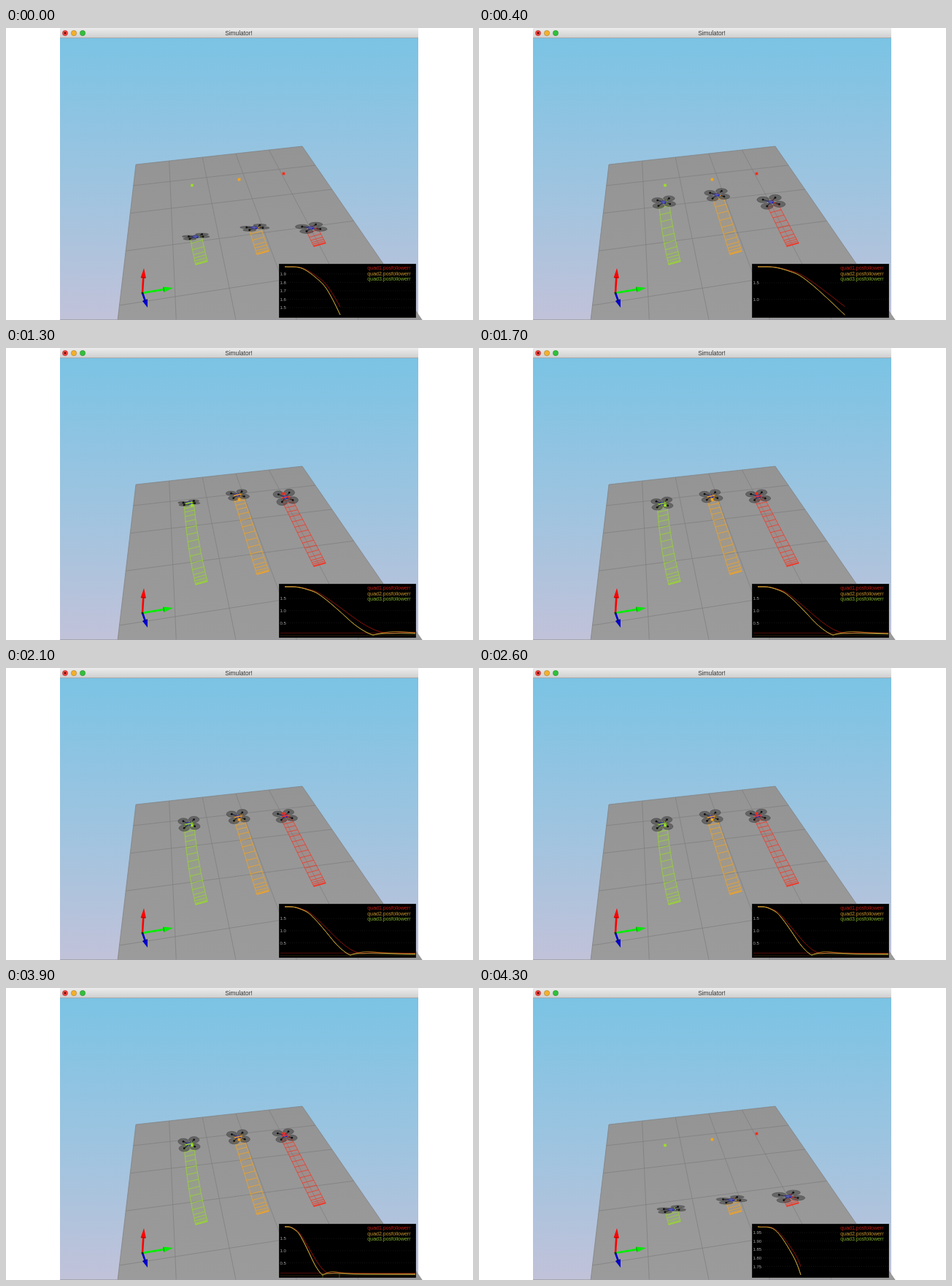
These frames come from a looping animation (640 px wide and 400 px high, 4.4 s). An HTML page with a canvas:

```html
<!DOCTYPE html>
<html lang="en">
<head>
<meta charset="utf-8">
<title>Simulator!</title>
<style>
  html, body { margin: 0; width: 100%; height: 100%; overflow: hidden; background: #fff; }
  canvas { display: block; width: 640px; height: 400px; }
</style>
</head>
<body>
<canvas id="stage" width="640" height="400"></canvas>
<script>
const ctx = document.getElementById('stage').getContext('2d');
const STEP = 100, STEPS = 44;
const FONT = '"Liberation Sans", Arial, sans-serif';
const lerp = (a, b, k) => a + (b - a) * k;

function segment(keys, x) {
  let i = 0;
  while (i < keys.length - 2 && x > keys[i + 1][0]) i++;
  const [x0] = keys[i], [x1] = keys[i + 1];
  return [i, Math.max(0, Math.min(1, (x - x0) / (x1 - x0)))];
}
function linear(keys, x) {
  const [i, k] = segment(keys, x);
  return lerp(keys[i][1], keys[i + 1][1], k);
}
function smooth(keys, x) {
  const [i, k] = segment(keys, x);
  const slope = j => {
    const a = keys[Math.max(0, j - 1)], b = keys[Math.min(keys.length - 1, j + 1)];
    return (b[1] - a[1]) / (b[0] - a[0]);
  };
  const h = keys[i + 1][0] - keys[i][0], k2 = k * k, k3 = k2 * k;
  return (2 * k3 - 3 * k2 + 1) * keys[i][1] + (k3 - 2 * k2 + k) * h * slope(i)
    + (3 * k2 - 2 * k3) * keys[i + 1][1] + (k3 - k2) * h * slope(i + 1);
}

// Simulated time per step; 1 is when the faster quads arrive.
const clock = [[0, .373], [1, .481], [9, 1.03], [14, 1.479], [22, 1.99], [33, 2.93], [40, 3.44], [43, 3.66]];

// Signed distance still to fly over simulated time.
const approach = [[0, 1.985], [.15, 1.965], [.3, 1.82], [.373, 1.7], [.481, 1.414], [.62, .98], [.78, .46], [.9, .16], [1, 0]];
const quads = [
  { color: '#ff2a18', label: '#c01c10', from: [430, 297], to: [381, 200], bow: 0, bend: 0, skew: 2.4, dot: [380.5, 199.5],
    error: [[0, 1.985], [.15, 1.97], [.3, 1.85], [.373, 1.75], [.481, 1.51], [.62, 1.15], [.78, .72], [.9, .43],
            [1.03, .19], [1.17, .07], [1.35, .1], [1.8, .06], [4, .04]],
    pitch: [[0, .35], [3, .25], [5, .5], [7, .85], [9, .95], [14, .65], [17, .52], [43, .55]] },
  { color: '#ffa516', label: '#c9952b', from: [352, 308], to: [319, 206], bow: .25, bend: 0, skew: 1.6, dot: [319.5, 207.5],
    error: [...approach, [1.22, -.13], [1.5, -.09], [1.9, -.05], [4, -.04]],
    pitch: [[0, .22], [3, .12], [5, .45], [7, .9], [9, .97], [12, .55], [14, .42], [17, .5], [22, .58], [43, .58]] },
  { color: '#9be022', label: '#7fae2b', from: [268, 322], to: [251, 215], bow: .25, bend: 9, skew: .6, dot: [255, 215.5],
    error: [...approach, [1.22, -.06], [1.5, -.05], [1.9, -.03], [4, -.02]],
    pitch: [[0, .2], [3, .1], [5, .45], [7, .95], [9, 1], [12, .4], [14, .2], [17, .5], [22, .6], [43, .6]] },
];

function place(quad, u) {
  const p = 1 - smooth(quad.error, u) / 1.985;
  const q = p + quad.bow * p * Math.max(0, 1 - p);
  const x = lerp(quad.from[0], quad.to[0], q) - quad.bend * q * (1 - q);
  return [x, lerp(quad.from[1], quad.to[1], q), q];
}

function line(points, color, width = 1) {
  ctx.beginPath();
  points.forEach(([x, y]) => ctx.lineTo(x, y));
  ctx.strokeStyle = color;
  ctx.lineWidth = width;
  ctx.stroke();
}
function fill(points, color) {
  ctx.beginPath();
  points.forEach(([x, y]) => ctx.lineTo(x, y));
  ctx.fillStyle = color;
  ctx.fill();
}
function ellipse(x, y, rx, ry, color, stroke) {
  ctx.beginPath();
  ctx.ellipse(x, y, rx, ry, 0, 0, 7);
  ctx.fillStyle = color;
  ctx.fill();
  if (stroke) {
    ctx.strokeStyle = stroke;
    ctx.lineWidth = .6;
    ctx.stroke();
  }
}
function text(string, x, y, size, color, align = 'left') {
  ctx.font = `${size}px ${FONT}`;
  ctx.textAlign = align;
  ctx.fillStyle = color;
  ctx.fillText(string, x, y);
}
function gradient(y0, y1, ...stops) {
  const g = ctx.createLinearGradient(0, y0, 0, y1);
  stops.forEach((c, i) => g.addColorStop(i / (stops.length - 1), c));
  return g;
}

function drawFloor() {
  const leftAt = y => [178 - (y - 187) * .117, y];
  const rightAt = y => [406 + (y - 162) * .69, y];
  fill([[178, 187], [406, 162], rightAt(400), leftAt(400)], gradient(162, 400, '#949494', '#9b9b9b'));
  for (let i = 0; i <= 5; i++) {
    const x = lerp(178, 406, i / 5), y = lerp(187, 162, i / 5);
    line([[x, y], [x + (400 - y) * lerp(-.117, .69, i / 5), 400]], '#7d7d7d', .7);
  }
  for (let i = 0; i < 5; i++) {
    const a = (187 + 3.4 * i) / (1 - .118 * i), b = (162 + 6.07 * i) / (1 - .106 * i);
    line([leftAt(a), rightAt(b)], '#7d7d7d', .7);
  }
}

function drawWindow() {
  ctx.fillStyle = gradient(0, 13, '#ececec', '#d0d0d0');
  ctx.fillRect(74, 0, 491, 13);
  ctx.fillStyle = '#aaa';
  ctx.fillRect(74, 13, 491, 1);
  ['#f4433c', '#f4b02c', '#2fc13a'].forEach((c, i) => ellipse(81 + 12 * i, 7, 3.7, 3.7, c, 'rgba(0,0,0,.3)'));
  ellipse(81, 7, 1.4, 1.4, '#5c0805');
  text('Simulator!', 319, 10, 8.4, '#333', 'center');
}

function arrow(x, y, color, dark) {
  const ox = 187, oy = 363, length = Math.hypot(x - ox, y - oy);
  const dx = (x - ox) / length, dy = (y - oy) / length;
  const head = Math.min(13, length * .5), bx = x - dx * head, by = y - dy * head;
  line([[ox, oy], [bx, by]], color, 2.6);
  fill([[bx - dy * 3.6, by + dx * 3.6], [x, y], [bx + dy * 3.6, by - dx * 3.6]], color);
  line([[bx - dy * 3.3, by + dx * 3.3], [bx + dy * 3.3, by - dx * 3.3]], dark, 1);
}

function drawTrail(quad, now) {
  const end = Math.min(now, 1.12), left = [], right = [];
  const edges = u => {
    const [x, y, q] = place(quad, u), w = lerp(8.2, 6.6, q), d = lerp(2.3, 1.4, q);
    return [[x - w, y + d], [x + w, y - d]];
  };
  ctx.globalAlpha = .85;
  for (let u = 0; u < end; u += .02) {
    const [a, b] = edges(u);
    left.push(a);
    right.push(b);
  }
  line(left, quad.color, .8);
  line(right, quad.color, .8);
  for (let u = 0; u < end; u += .055) line(edges(u), quad.color, .8);
  ctx.globalAlpha = .08;
  fill([...left, ...right.reverse()], quad.color);
  ctx.globalAlpha = 1;
}

function drawQuad(quad, now, step) {
  const [x, y, q] = place(quad, now);
  const size = lerp(1.38, 1, Math.min(1, q)), pitch = linear(quad.pitch, step);
  const rotors = [[-1, -1], [1, -1], [-1, 1], [1, 1]].map(([sx, sy]) => [
    x + size * (sx * 7.3 + sy * quad.skew),
    y + size * (sy * 7.8 * pitch - sx * 1.2)]);
  rotors.forEach(([rx, ry]) =>
    ellipse(rx, ry, 7.2 * size, Math.max(1.4, 7.2 * size * pitch), 'rgba(62,62,62,.55)', 'rgba(45,45,45,.6)'));
  rotors.forEach(([rx, ry], i) => {
    line([[x, y], [rx, ry]], '#292929', 1.2);
    line([[x, y], [lerp(x, rx, .6), lerp(y, ry, .6)]], i % 2 ? quad.color : '#39399c', .9);
    ellipse(rx, ry, 1.4, 1.4, '#111');
  });
  ellipse(x, y, 3.4 * size, Math.max(2, 4 * pitch), '#5557a8', '#282860');
  ellipse(x + 2, y + 1, .9, .9, '#1818d0');
  if (q > .9) line([[x - 5, y + 1], [x + 5, y - 1]], quad.color, 1.3);
}

function drawPlot(now) {
  const TOP = 1.985, LEFT = 382, WIDTH = 179;
  const width = Math.min(WIDTH, 158 * now), samples = 180, lows = [];
  const curves = quads.map(quad => Array.from({ length: samples + 1 }, (_, i) => {
    const e = Math.abs(smooth(quad.error, now * i / samples));
    lows.push(e);
    return [LEFT + width * i / samples, e];
  }));
  const range = TOP - Math.min(...lows), yAt = e => 327 + (TOP - e) / range * 66;

  ctx.fillStyle = '#000';
  ctx.fillRect(374, 323, 188, 74);
  ctx.strokeStyle = '#333';
  ctx.lineWidth = .5;
  ctx.strokeRect(374.25, 323.25, 187.5, 73.5);

  const tick = [.05, .1, .2, .5].find(s => range / s <= 6);
  for (let i = Math.floor(TOP / tick + 1e-6); i > 0 && yAt(i * tick) < 391; i--) {
    const y = yAt(i * tick);
    ctx.setLineDash([1, 2]);
    line([[386, y], [561, y]], '#222', .6);
    ctx.setLineDash([]);
    text((i * tick).toFixed(tick < .1 ? 2 : 1), 375.5, y + 2.2, 6, '#aaa');
  }
  if (now > .95) {
    line([[376, yAt(.08)], [561, yAt(.08)]], '#701510', .7);
    line([[376, yAt(-.03)], [561, yAt(-.03)]], '#4a3510', .6);
  }
  [[1, 2.6], [1.44, 3.3]].forEach(([u, shown]) => {
    const x = LEFT + width * u / now;
    if (now > shown) line([[x, 391], [x, 397]], '#586b25', .7);
  });
  const inks = ['#b3160c', '#d0992c', '#a9b54a'];
  [0, 2, 1].forEach(i => line(curves[i].map(([x, e]) => [x, yAt(e)]), inks[i], .9));
  quads.forEach((quad, i) => text(`quad${i + 1}.posfollowerr`, 554.5, 331 + 7.5 * i, 7, quad.label, 'right'));
}

function draw(time) {
  const step = (Math.floor(time / STEP) + 1) % STEPS, now = linear(clock, step);
  ctx.fillStyle = '#fff';
  ctx.fillRect(0, 0, 640, 400);
  ctx.fillStyle = gradient(14, 400, '#7bc3e4', '#9cc4e0', '#c1c2d9');
  ctx.fillRect(74, 13, 491, 387);
  drawFloor();
  quads.forEach(quad => drawTrail(quad, now));
  quads.forEach(quad => drawQuad(quad, now, step));
  quads.forEach(({ dot: [x, y], color }) => {
    ctx.fillStyle = color;
    ctx.fillRect(x - 1.8, y - 1.8, 3.6, 3.6);
  });
  arrow(189, 329, '#f00', '#a00');
  arrow(229, 356, '#0e0', '#090');
  arrow(194, 383, '#00c', '#007');
  ellipse(187, 363, 1.5, 1.5, '#222');
  drawPlot(now);
  drawWindow();
  ctx.fillStyle = '#9a9aa2';
  ctx.fillRect(74, 399.3, 491, .7);
}

const start = performance.now();
function loop() {
  draw(performance.now() - start);
  requestAnimationFrame(loop);
}
loop();
</script>
</body>
</html>
```
